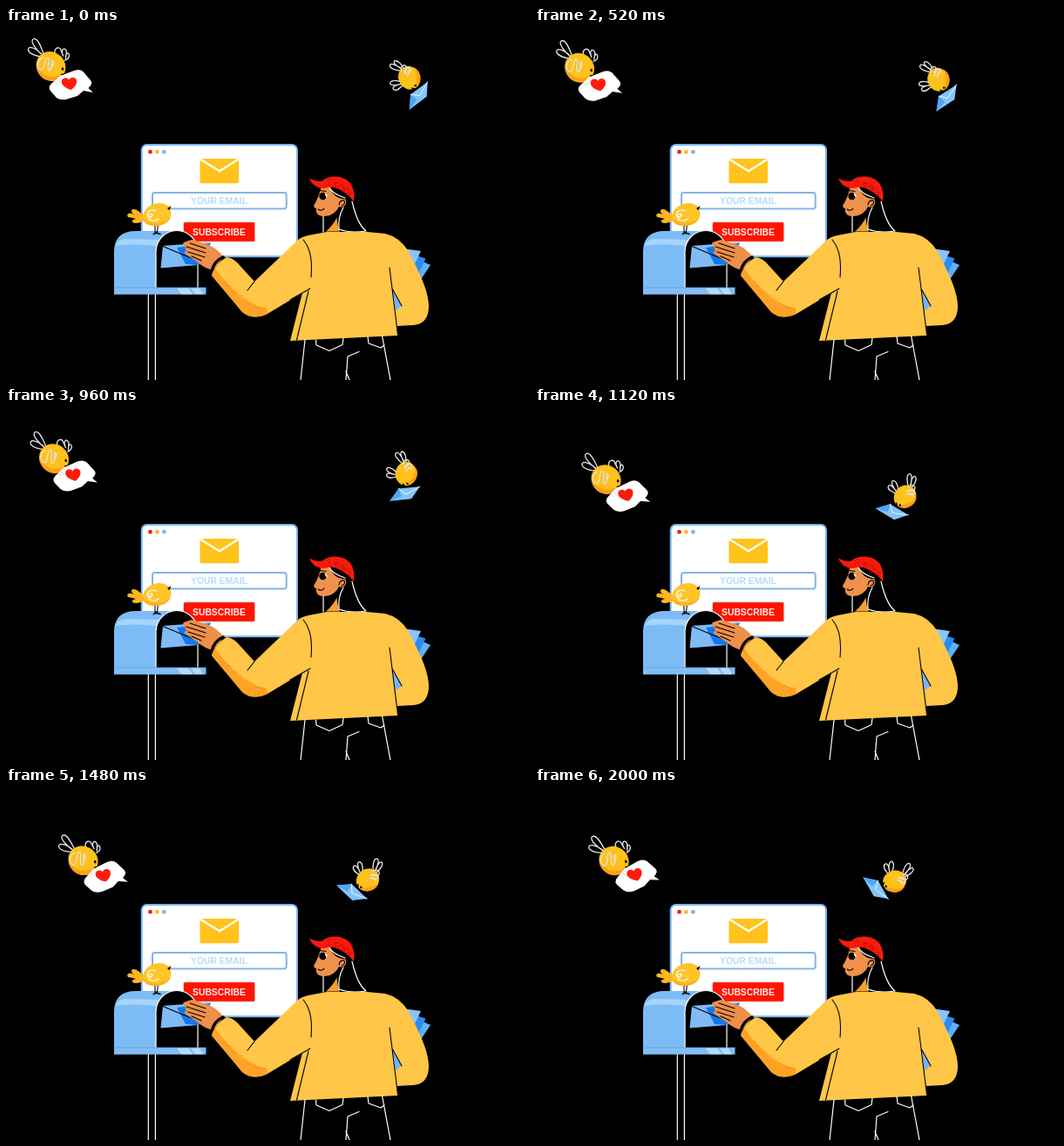
An HTML page that plays this animation: 600 by 404 pixels, repeating every 3 s.

```html
<!DOCTYPE html>
<html lang="en">
<head>
<meta charset="utf-8">
<title>Subscribe by email</title>
<style>
  html, body { margin: 0; width: 100%; height: 100%; overflow: hidden; background: #000; }
  svg { display: block; width: 100%; height: 100%; }
  text { font: bold 10.36px "Liberation Sans", Arial, sans-serif; }
  .line { fill: none; stroke-linecap: round; stroke-linejoin: round; }
  .white { stroke: #fff; stroke-width: 1.2; }
  .black { stroke: #000; stroke-width: 1.1; }
  .wing { stroke: #e2e2e2; stroke-width: 1.35; }
</style>
</head>
<body>
<svg viewBox="0 0 600 404">
  <rect width="600" height="404"/>

  <g id="browser">
    <rect x="155.7" y="134" width="178.3" height="128.3" rx="6" fill="#fff" stroke="#79b5f1" stroke-width="2"/>
    <circle cx="165.5" cy="142.2" r="2.4" fill="#ff1b0a"/>
    <circle cx="173.4" cy="142.2" r="2.4" fill="#ffb92e"/>
    <circle cx="181.4" cy="142.2" r="2.4" fill="#7ab7f3"/>
    <rect x="222.5" y="150" width="44.5" height="28.2" rx="2" fill="#ffc31c"/>
    <path class="line" d="M223.5 151 245 164.300 266 151" stroke="#fff" stroke-width="2.3"/>
    <rect x="168" y="189" width="153.7" height="18.500" rx="3" fill="#fff" stroke="#84b3e8" stroke-width="2"/>
    <text x="212" y="202.200" fill="#b7dcfb">YOUR EMAIL</text>
    <rect x="203.500" y="222.700" width="82.300" height="22.600" rx="2" fill="#ff1400" stroke="#d9d5d5"/>
    <text x="214" y="237.700" fill="#fff0ec">SUBSCRIBE</text>
  </g>

  <g id="mailbox">
    <path class="line white" d="M163.300 305V404M171.400 305V404"/>
    <path d="M124 299V257Q124 233 149 233H196Q220 234 220 258V299Z" fill="#7dbbf5"/>
    <path d="M125 250Q128 243 136 242L176 243 172.500 250Q145 247 125 250Z" fill="#a6d4fb"/>
    <path d="M172 298V257A24 24.500 0 0 1 220 257V298Z"/>
    <path class="line white" d="M172 298V257A24 24.500 0 0 1 220 257V298"/>
    <path d="M180 250 235 246 221 272 177.500 275.500Z" fill="#80bbf7"/>
    <path d="M196 252 235 247 220 272 206 271Z" fill="#1277ee"/>
    <path class="line black" d="M180 250.500 205 261 232 271"/>
    <rect x="124" y="298" width="105.500" height="7.800" fill="#82bdf5"/>
    <path d="M196 298.500H209L214 305.500H201ZM212 298.500H222L226 305.500H217Z" fill="#b4dbfb"/>
    <path class="line" d="M124 298H229" stroke="#5d9fde" stroke-width=".8"/>
  </g>

  <g id="perched">
    <path class="line black" d="M171 225V236M174.500 225 173.500 234M169 237 172 234 177 237M170 236H177"/>
    <path d="M160 215C153 213 151 207 145 208Q142 211 147 214C140 211 138 214 140 217Q146 218 149 219C144 220 143 223 148 224Q155 224 162 219Z" fill="#ffb51f"/>
    <path d="M157 216C158 208 166 201 176 201C185 201 190 207 189.500 214C188 223 180 227 171 227C162 227 157 223 157 216Z" fill="#ffc528"/>
    <path d="M157 217Q161 223 171 224 182 224 189 217C186 224 179 227 171 227 162 227 157 223 157 217Z" fill="#ffb020"/>
    <path d="M185 207 189.500 204 187.500 209Z"/>
    <path class="line white" d="M172 210C165 207 160 213 163 216C166 219 170 214 167 213C162 213 163 221 168 221Q172 222 175 219"/>
  </g>

  <g id="person">
    <path d="M478 268 487 272 475 290 464 284Z" fill="#5fb0f7"/>
    <path d="M470 261 481.500 264.500 471 286 460 280Z" fill="#2a8bf1"/>
    <path d="M455 253 476 256 465 279Z" fill="#8ac4fa"/>
    <path d="M440 291 458 320 444 328Z" fill="#74b5f6"/>

    <path d="M364 190 397 194Q400 222 414 234H364Z"/>
    <path d="M379.500 217.500Q380 227 383 233.500H367Q375 227 379.500 217.500Z" fill="#f6a02e"/>
    <path d="M362 181C360 189 358 196 353.500 203Q352 206 356 207C355 212 358 216 364 216C374 216 379 211 382 205C389 208 393 199 388 195L380 192 371 181Z" fill="#ef914b"/>
    <path d="M371 181C374 193 383 197 391 196L396 192 390 185Z"/>
    <circle cx="363.500" cy="193" r="4.200"/>
    <path d="M365.500 189.500Q369 190.500 368.500 194.500Q366 193 365.500 189.500Z" fill="#fff"/>
    <path class="line black" d="M360 186.500 367 187.500M358 208Q362 211 365 207M382 203Q383 197 388 198 390 202 385 204"/>
    <path class="line white" d="M364 216V234M387 206C383 213 381 222 382 231Q396 236 413 233C404 226 400 212 397 199M371 183C374 190 383 193 389 195"/>
    <path d="M348 172.500Q356 177 363 175.500C370 168.500 387 168.500 395 178Q401 186 399 199C391 189 382 183.500 372 182.500Q367 184 361 184 351 181 348 172.500Z" fill="#f91a0c"/>
    <g id="cap-grain" fill="#a20b06"></g>

    <path d="M204 246 213 243 226 247Q240 250 250 263L238 278Q228 276 220 269L207 260Q202 257 207 256L205 251Q202 248 204 246Z" fill="#ee8f4b"/>
    <path class="line black" d="M211 247 229 253M207 251 229 258M209 257 228 263M213 262 224 267"/>
    <path class="line" d="M249 263Q239 267 236 279" stroke="#000" stroke-width="3.500"/>

    <path d="M253 263Q260 264 265 269L285 291 332 246Q337 240 347 238L368 234H414L435 236Q452 240 462 257C474 280 485 302 485 319Q485 339 468 341L449 342V353L326 359 340 304 300 328Q283 336 271 326L236 284Q240 271 253 263Z" fill="#ffc647"/>
    <path d="M236 284Q237 279 240 276 252 293 270 309 280 320 299 321L300 328Q283 336 271 326Z" fill="#ffa326"/>
    <g id="sleeve-grain" fill="#f98b12"></g>
    <path d="M443 300 454 319 447 324Z" fill="#74b5f6"/>
    <path class="line black" d="M285 291 277 301M341 243C348 251 352 264 350 286M349 299 326 312M347 302 333.500 358M440 275 449.500 352M443 299 454 319"/>

    <path class="line white" d="M343 358 338 404M355.500 358 356 364 371 370.500 386 363.500 387 356M415 354 416 362 430 367 434 364M431.500 353 441 404M405 371.500 392 377 390 404M390 394 394 404"/>
  </g>

  <g id="love-bird">
    <path class="line wing" d="M-8-13C-11-22-15-33-20-31.500C-25-29-16-18-9-12C-15-20-26-25-26-19C-25-14-15-11-9-11M6-13C2-18 7-24 11-20L14-12C11-20 16-23 18-17L17-9C17-16 21-17 21-12Q20-8 16-7"/>
    <ellipse rx="17.600" ry="16.200" fill="#ffc11b" transform="rotate(45)"/>
    <path d="M-16.300-3Q-14 9 0 12 10 12 15 7 9 17 0 16.700C-11 16-17 7-16.300-3Z" fill="#ff9e17"/>
    <path class="line wing" d="M-9-10C-17-7-16 4-11 4C-6 3-8-8-4-10C1-10-6 3-2 5C3 4-1-6 2-7Q5-4 0 2"/>
    <ellipse cx="13.500" cy="3" rx="1.300" ry="1.800"/>
    <path d="M11 9 16 8 15 13Z"/>
    <g transform="translate(-.6 -1)">
      <path d="M1 21 11 12 27 6Q34 3.500 38 7.500L46 17Q49 20.500 45 24.500L43.500 26 49 31 38 29 31 35 18 39Q10 40 6 36L0 29Q-3 25 1 21Z" fill="#fff"/>
      <path class="line" d="M5 18 8 22M8 16 11 20M11 14 14 17" stroke="#ccc" stroke-width=".8"/>
      <path d="M24 28C17 26 12 22 13 17.500C14 13.500 19 13 21.500 16.500C23 12.500 29 13 30 17C31 21 28 25 24 28Z" fill="#ff1b0b"/>
    </g>
  </g>

  <g id="mail-bird">
    <path class="line wing" d="M-8-8C-15-8-24-11-22-15C-20-18-11-12-7-9C-12-12-20-17-17-19.500C-13-21-8-14-6-10M-9 5C-15 2-23 3-22 7C-20 10-13 8-9 7C-14 8-21 10-18 13.500C-14 16-10 11-7 8"/>
    <ellipse rx="13.700" ry="12.300" fill="#ffc11b" transform="rotate(60)"/>
    <path d="M5-12C15-8 15 6 7 11 10 2 9-7 5-12Z" fill="#ff9e17"/>
    <path class="line wing" d="M-9-8C-11-14-5-17-3-12L-5-4C-6-12 0-15 1-9L-2-3Q-1-10 3-9"/>
    <ellipse cx="7" cy="9" rx="1.400" ry="1.100"/>
    <path d="M2 11 7 12 5 16Z"/>
    <path d="M1.500 19 21 4.500 20 21.500 0 36.500Z" fill="#83c4fa"/>
    <path d="M1.500 19 9 25 0 36.500Z" fill="#4ea5f4"/>
    <path class="line" d="M1.500 19 12 20.500 21 4.500" stroke="#e2f3ff"/>
  </g>
</svg>
<script>
const LOOP = 3000, MOVE = 2000, STEP = 40;
const times = [0, 320, 680, 960, 1120, 1480, 2000];
const flights = {
  'love-bird': {
    x: [51.5, 51.3, 51, 55, 81.5, 88.5, 90.5],
    y: [44, 44.3, 48, 58, 82, 83.3, 83.5],
    turn: [0, -.3, -2, -3, -5, -6.5, -9]
  },
  'mail-bird': {
    x: [462.7, 462.9, 462.7, 459, 424.5, 415, 412.5],
    y: [57.2, 57.7, 61.8, 75.5, 101.7, 105.5, 107],
    turn: [0, 1.5, 7, 31, 68, 80, 97]
  }
};

// Monotone cubic curve through the steps, at rest at both ends.
function curve(values, time) {
  const slope = i => (values[i + 1] - values[i]) / (times[i + 1] - times[i]);
  const tangent = i => {
    if (i === 0 || i === times.length - 1) return 0;
    const a = slope(i - 1), b = slope(i);
    return a * b > 0 ? 2 * a * b / (a + b) : 0;
  };
  let i = 0;
  while (i < times.length - 2 && time >= times[i + 1]) i++;
  const span = times[i + 1] - times[i];
  const u = (time - times[i]) / span, v = 1 - u;
  return v * v * (1 + 2 * u) * values[i] + u * u * (3 - 2 * u) * values[i + 1]
    + span * u * v * (v * tangent(i) - u * tangent(i + 1));
}

let seed = 7;
const random = () => (seed = seed * 16807 % 2147483647) / 2147483647;

function grain(id, count, place) {
  let path = '';
  for (let i = 0; i < count; i++) {
    const [x, y] = place(random(), random());
    path += `M${x.toFixed(1)} ${y.toFixed(1)}h.8v.8h-.8z`;
  }
  document.getElementById(id).innerHTML = `<path d="${path}"/>`;
}
grain('cap-grain', 60, (u, v) => [367 + 29 * u, 173 + 14 * u * u + 8 * v]);
grain('sleeve-grain', 130, (u, v) => [242 + 54 * u, 281 + 60 * u - 18 * u * u + 9 * v * v * (1 - u)]);

const birds = Object.entries(flights).map(([id, flight]) => [document.getElementById(id), flight]);
const start = performance.now();

function draw(now) {
  const elapsed = Math.max(0, now - start) % LOOP;
  const time = Math.min(MOVE, Math.floor(elapsed / STEP) * STEP);
  for (const [bird, { x, y, turn }] of birds) {
    bird.setAttribute('transform',
      `translate(${curve(x, time)} ${curve(y, time)}) rotate(${curve(turn, time)})`);
  }
  requestAnimationFrame(draw);
}
draw(start);
</script>
</body>
</html>
```
